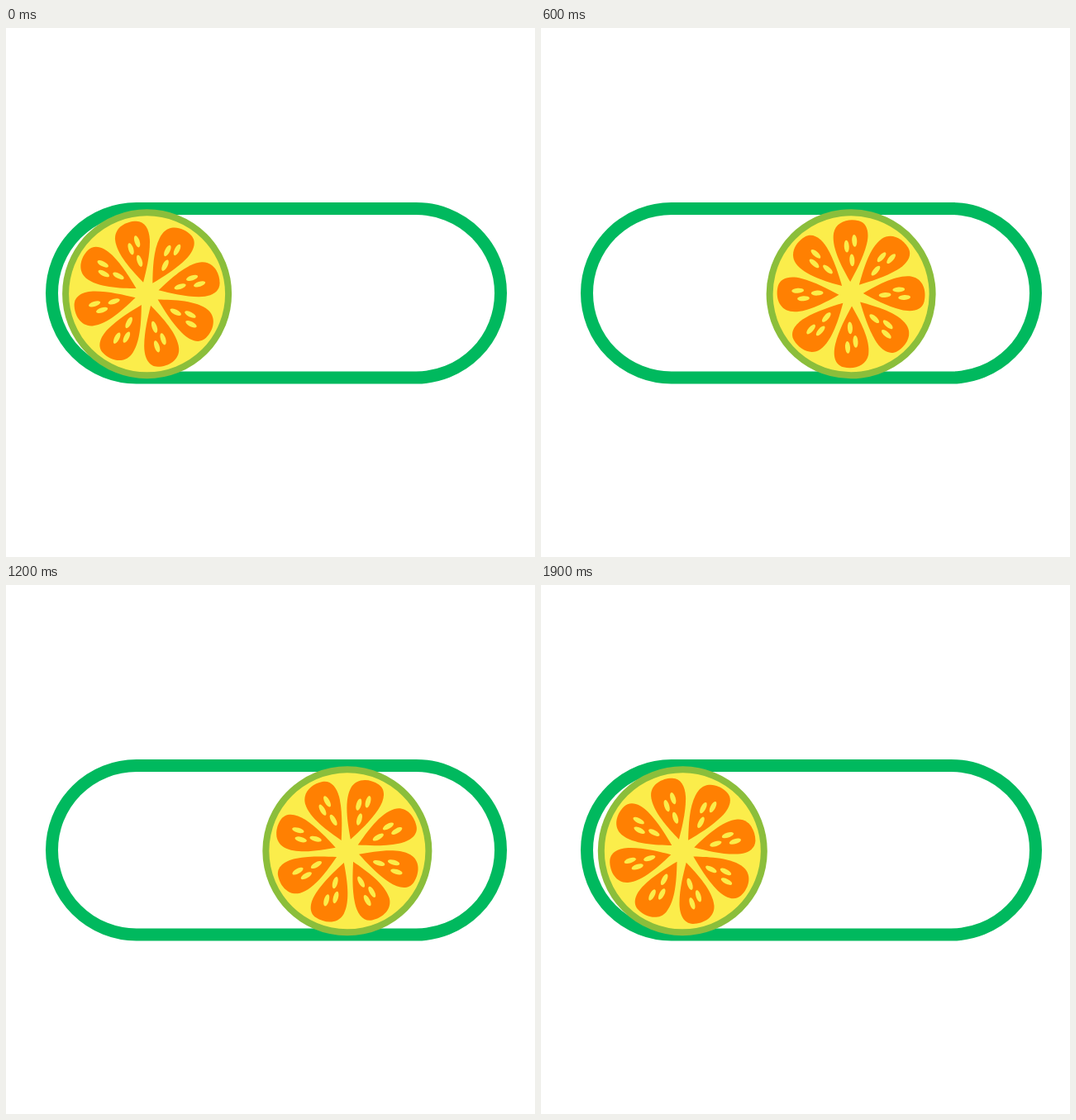
These frames come from a looping animation (640x640 px, 2 s). An HTML page:

```html
<!DOCTYPE html>
<html lang="en">
<head>
<meta charset="utf-8">
<title>Rolling citrus toggle</title>
<style>
  html, body { margin: 0; width: 100%; height: 100%; overflow: hidden; background: #fff; }
  svg { display: block; width: 100%; height: 100%; }
</style>
</head>
<body>
<svg viewBox="0 0 640 640">
  <defs>
    <g id="segment">
      <path fill="#ff8002" d="M-4.5-14C-18-28-37-48-38.6-66C-39.5-80-26-88-13-88C-2-88 3.4-77 3.4-63C3.4-46-1-28-4.5-14Z"/>
      <g fill="#fbed4b">
        <ellipse rx="3" ry="7.4" transform="translate(-12 -63.5) rotate(-18)"/>
        <ellipse rx="3" ry="7.4" transform="translate(-19.5 -54.5) rotate(-18)"/>
        <ellipse rx="3" ry="7.4" transform="translate(-9 -40) rotate(-18)"/>
      </g>
    </g>
  </defs>
  <rect x="55.5" y="218.5" width="543" height="204.5" rx="102.25" fill="none" stroke="#00b95e" stroke-width="15"/>
  <g id="fruit">
    <circle r="98.5" fill="#fbed4b" stroke="#8bbe3b" stroke-width="8"/>
  </g>
</svg>
<script>
  const LOOP = 2000, STEP = 40;
  const START_X = 170.6, CENTER_Y = 321.8, TRAVEL = 313.6, TURN = 160;
  const fruit = document.getElementById('fruit');

  for (let i = 0; i < 8; i++) {
    const segment = document.createElementNS('http://www.w3.org/2000/svg', 'use');
    segment.setAttribute('href', '#segment');
    segment.setAttribute('transform', `rotate(${i * 45})`);
    fruit.append(segment);
  }

  // Roll right, pause briefly, roll back; time advances in 40 ms steps.
  function progress(time) {
    const step = Math.floor((time % LOOP) / STEP);
    return Math.max(0, Math.min(1, step / 23, (47.05 - step) / 22.07));
  }

  function draw() {
    const p = progress(performance.now());
    fruit.setAttribute('transform',
      `translate(${START_X + TRAVEL * p} ${CENTER_Y}) rotate(${TURN * p})`);
    requestAnimationFrame(draw);
  }
  draw();
</script>
</body>
</html>
```
